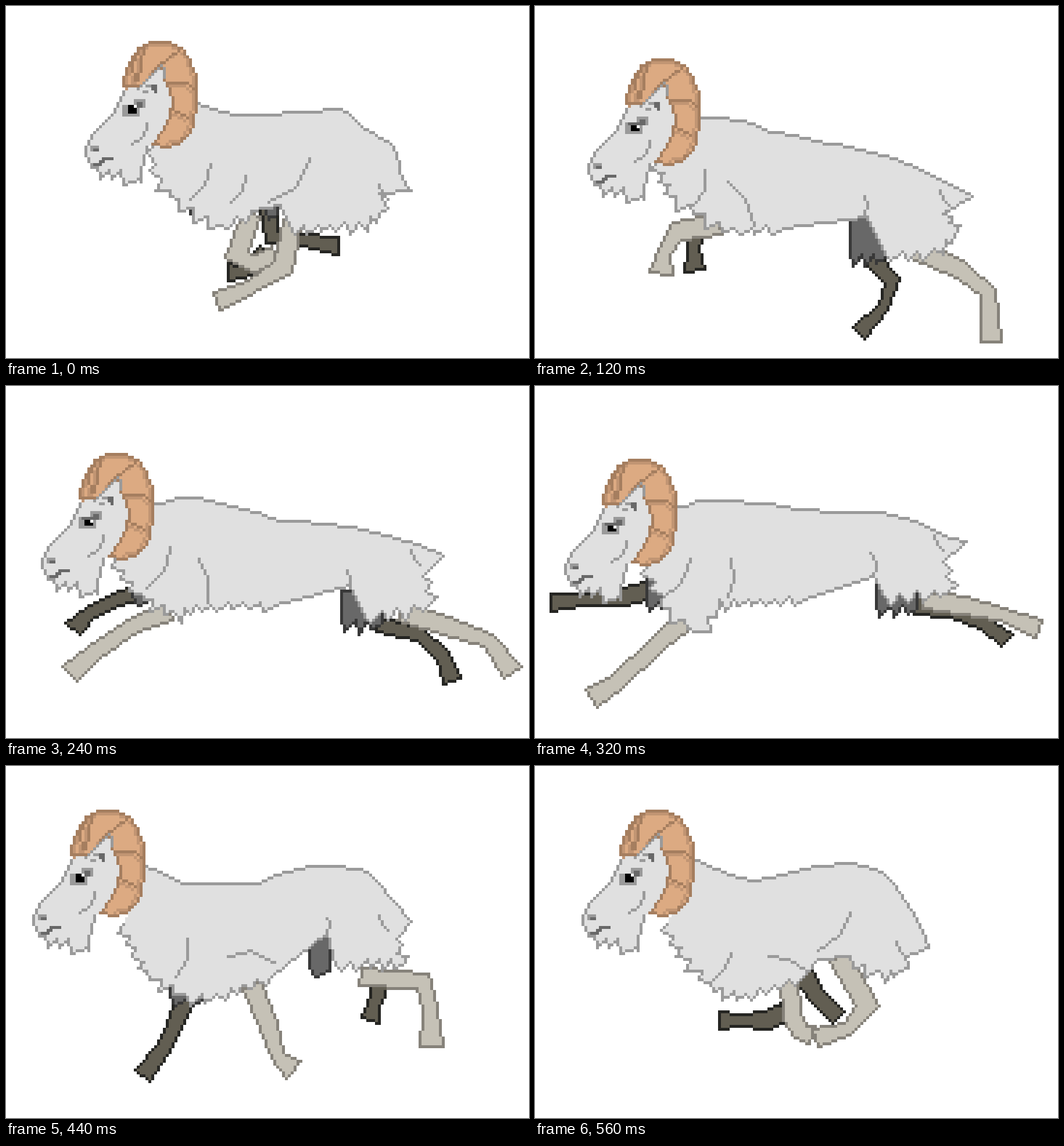
Write an HTML page with a canvas that moves like this. It is 900 px wide and 605 px high and loops after 600 ms.

```html
<!DOCTYPE html>
<html lang="en">
<head>
<meta charset="utf-8">
<title>Running ram</title>
<style>
html, body { margin: 0; width: 100%; height: 100%; overflow: hidden; background: #fff; }
canvas { display: block; }
</style>
</head>
<body>
<canvas id="stage" width="900" height="605"></canvas>
<script>
const CELL = 5, STEP_MS = 40, STEPS = 15;
const ctx = document.getElementById('stage').getContext('2d');

const WOOL = { fill: '#e0e0e0', line: '#9a9a9a' };
const FAR_WOOL = { fill: '#686868', line: '#383838' };
const NEAR_LEG = { fill: '#c5c1b6', line: '#86827a' };
const FAR_LEG = { fill: '#625e52', line: '#252522' };
const HORN = { fill: '#dcaa82', line: '#a57e5f', shade: '#c19573' };

// Key poses in cells. back: neck to tail tip; hem: tail base to throat;
// folds: shoulder, elbow, thigh lines; wool: far tufts as x, y, width, height;
// legs: hip, knee, ankle and hoof of near front, near hind, far front, far hind.
const POSES = [
  { step: 0, head: [0, 0],
    back: [66,33, 79,37, 103,36, 115,35, 123,42, 133,48, 136,59, 139,63],
    hem: [128,64, 129,71, 121,75, 97,76, 94,68, 84,70, 74,76, 59,67, 52,60, 49,48],
    folds: [[70,54, 63,66], [82,58, 77,67], [104,52, 90,67]],
    wool: [[63,66,4,7], [89,67,4,5]],
    legs: [[84,71, 79,85, 85,88, 92,85], [98,74, 95,89, 84,96, 72,101], [90,69, 91,79, 101,80, 114,82], [89,84, 84,89, 80,91, 76,91]] },
  { step: 2, head: [-4, 3],
    back: [62,36, 72,40, 84,43, 104,44, 119,47, 134,54, 143,65, 148,66],
    hem: [134,71, 140,77, 136,84, 114,86, 108,72, 78,75, 69,77, 57,72, 49,66, 45,49],
    folds: [[57,62, 57,70], [67,62, 78,75], [107,60, 105,72]],
    wool: [[64,70,2,2], [102,72,12,16]],
    legs: [[65,75, 51,79, 56,87, 62,93], [121,84, 140,92, 145,100, 144,117], [60,79, 64,82, 67,85, 69,89], [105,84, 105,95, 95,102, 81,109]] },
  { step: 4, head: [-14, 9],
    back: [52,39, 65,37, 76,42, 90,48, 104,51, 121,53, 141,57, 152,63],
    hem: [145,70, 150,78, 138,83, 126,86, 119,71, 92,76, 67,77, 59,72, 46,66, 36,58],
    folds: [[58,50, 51,66], [64,58, 71,75], [119,69, 119,72]],
    wool: [[48,69,4,3], [113,72,13,18]],
    legs: [[61,74, 46,75, 32,81, 24,90], [138,81, 153,89, 166,96, 169,113], [53,71, 44,74, 41,82, 40,92], [125,88, 140,93, 144,104, 141,115]] },
  { step: 8, head: [-17, 13],
    back: [49,41, 60,39, 80,40, 100,43, 119,43, 133,47, 141,51, 148,53],
    hem: [140,60, 143,70, 131,71, 120,73, 116,65, 92,73, 63,74, 56,84, 46,77, 37,62],
    folds: [[53,59, 44,72], [67,59, 66,72], [115,57, 116,65]],
    wool: [[38,64,8,13], [117,68,14,10]],
    legs: [[51,80, 42,88, 28,101, 19,107], [133,73, 147,75, 160,78, 173,83], [42,69, 30,72, 16,73, 5,74], [130,75, 143,77, 154,81, 162,87]] },
  { step: 10, head: [-18, 5],
    back: [48,34, 63,40, 93,40, 105,36, 127,36, 134,40, 140,47, 144,49],
    hem: [138,57, 144,66, 130,63, 117,71, 114,58, 87,72, 74,78, 61,79, 48,72, 39,57],
    folds: [[61,56, 55,69], [74,66, 90,68], [113,51, 114,58]],
    wool: [[38,65,13,14], [109,57,5,17]],
    legs: [[81,74, 81,92, 80,108, 76,117], [130,72, 153,73, 158,82, 161,94], [41,76, 34,83, 25,91, 14,98], [139,66, 139,74, 138,80, 138,88]] },
  { step: 12, head: [-18, 1],
    back: [48,33, 59,39, 76,40, 94,33, 111,33, 121,39, 129,49, 133,57],
    hem: [129,61, 129,69, 117,70, 109,66, 106,55, 95,71, 71,80, 61,78, 48,70, 40,52],
    folds: [[63,61, 61,74], [77,63, 93,65], [107,52, 106,55]],
    wool: [[74,77,9,9], [99,56,9,17]],
    legs: [[87,75, 99,86, 106,90, 121,91], [113,72, 133,74, 133,85, 131,98], [81,84, 81,95, 81,104, 79,114], [119,78, 116,81, 114,84, 112,86]] },
  { step: 14, head: [-11, 3],
    back: [55,32, 71,38, 81,38, 96,34, 113,34, 123,40, 131,52, 135,62],
    hem: [127,65, 126,70, 118,71, 108,66, 97,66, 92,72, 72,79, 60,75, 52,67, 44,54],
    folds: [[67,64, 61,73], [80,65, 93,70], [108,50, 97,63]],
    wool: [[90,68,2,2], [98,62,4,2]],
    legs: [[87,72, 88,86, 91,91, 95,92], [104,65, 114,82, 107,90, 96,93], [91,70, 96,78, 100,82, 104,86], [85,84, 79,87, 70,87, 63,87]] }
];

const mix = (a, b, t) => a + (b - a) * t;
const mixPoint = (p, q, t) => [mix(p[0], q[0], t), mix(p[1], q[1], t)];
const random = seed => { const r = Math.sin(seed * 12.9898) * 43758.5453; return r - Math.floor(r); };
const pairs = flat => flat.flatMap((x, i) => i % 2 ? [] : [[x, flat[i + 1]]]);
const snap = points => points.map(p => p.map(Math.round));

function blend(a, b, t) {
  if (typeof a === 'number') return mix(a, b, t);
  if (Array.isArray(a)) return a.map((v, i) => blend(v, b[i], t));
  return Object.fromEntries(Object.keys(a).map(k => [k, blend(a[k], b[k], t)]));
}

// Catmull-Rom curve through the points
function smooth(points) {
  const at = i => points[Math.max(0, Math.min(points.length - 1, i))];
  const out = [];
  for (let i = 0; i < points.length - 1; i++)
    for (let t = 0; t < 1; t += 0.25)
      out.push([0, 1].map(k => {
        const [a, b, c, d] = [-1, 0, 1, 2].map(j => at(i + j)[k]);
        return b + t / 2 * (c - a + t * (2 * a - 5 * b + 4 * c - d + t * (3 * (b - c) + d - a)));
      }));
  return [...out, points[points.length - 1]];
}

// Ragged wool along a line, with locks pointing away from the body
function tufts(points, seed) {
  const out = [points[0]];
  for (let i = 1; i < points.length; i++) {
    const a = points[i - 1], b = points[i];
    const dx = b[0] - a[0], dy = b[1] - a[1], length = Math.hypot(dx, dy) || 1;
    const count = Math.max(1, Math.round(length / 5));
    const push = (u, out1) => {
      const [x, y] = mixPoint(a, b, u);
      out.push([x + dy / length * out1, y - dx / length * out1]);
    };
    for (let k = 0; k < count; k++) {
      push((k + 0.7) / count, 1 + 2.5 * random(seed + i * 7 + k));
      push((k + 1) / count, -0.8);
    }
  }
  return out;
}

// Outline of a leg around its joints, narrow above the hoof
function limb(joints, scale) {
  const half = [3.5, 3, 2.5, 3.6];
  const normal = (p, q) => {
    const d = Math.hypot(q[0] - p[0], q[1] - p[1]) || 1;
    return [(q[1] - p[1]) / d, (p[0] - q[0]) / d];
  };
  const side = sign => joints.map((p, i) => {
    const before = normal(joints[Math.max(0, i - 1)], joints[Math.max(1, i)]);
    const after = normal(joints[Math.min(2, i)], joints[Math.min(3, i + 1)]);
    const sx = before[0] + after[0], sy = before[1] + after[1], size = Math.hypot(sx, sy) || 1;
    const w = sign * half[i] * scale / Math.max(0.7, size / 2) / size;
    return [p[0] + sx * w, p[1] + sy * w];
  });
  return [...side(1), ...side(-1).reverse()];
}

function fill(path, color) {
  const points = snap(path), ys = points.map(p => p[1]);
  ctx.fillStyle = color;
  for (let y = Math.min(...ys); y <= Math.max(...ys); y++) {
    const hits = [];
    points.forEach(([x1, y1], i) => {
      const [x2, y2] = points[(i + 1) % points.length];
      if ((y1 <= y) !== (y2 <= y)) hits.push(x1 + (y - y1) / (y2 - y1) * (x2 - x1));
    });
    hits.sort((p, q) => p - q);
    for (let i = 0; i + 1 < hits.length; i += 2) {
      const left = Math.ceil(hits[i]);
      ctx.fillRect(left, y, Math.floor(hits[i + 1]) - left + 1, 1);
    }
  }
}

function stroke(path, color) {
  const points = snap(path);
  ctx.fillStyle = color;
  for (let i = 1; i < points.length; i++) {
    const a = points[i - 1], b = points[i];
    const n = Math.max(Math.abs(b[0] - a[0]), Math.abs(b[1] - a[1])) || 1;
    for (let k = 0; k <= n; k++) ctx.fillRect(...mixPoint(a, b, k / n).map(Math.round), 1, 1);
  }
}

function shape(points, style) {
  fill(points, style.fill);
  stroke([...points, points[0]], style.line);
}

function rects(color, ...list) {
  ctx.fillStyle = color;
  for (const r of list) ctx.fillRect(...r);
}

const FACE = [
  ...pairs([41,28, 39,31, 37,36, 33,40, 30,43, 28,46, 27,48, 27,51, 29,55]),
  ...tufts([[46, 59], [39, 57], [31, 56]], 3).reverse(),
  ...pairs([46,60, 46,56, 48,48])
];
const EAR = pairs([45,28, 48,25, 53,20, 54,21, 54,24]);
const SKULL = [[52, 46], [57, 37], [57, 31], ...EAR.slice().reverse()];
const HORN_INNER = pairs([50,47, 53,43, 56,37, 57,32, 54,24, 53,20, 48,25, 46,27, 40,27]);
const HORN_RIDGES = [[47,13, 46,20, 45,25], [45,15, 43,20, 44,25], [59,15, 57,16, 50,22], [56,26, 62,26, 64,28], [57,35, 59,36, 62,38]].map(pairs);

// Rounded arc from the forehead over the top and down to the horn's tip
function hornArc(rx, ry) {
  const round = v => Math.sign(v) * Math.abs(v) ** 0.84;
  return Array.from({ length: 33 }, (_, i) => {
    const angle = mix(-3.3, 1.65, i / 32) + 0.1;
    return [52.5 + rx * round(Math.cos(angle)), 30 + ry * round(Math.sin(angle))];
  }).filter(p => p[0] > 52 || p[1] < 28);
}

function drawHorn() {
  const edge = [...hornArc(12.5, 18), ...HORN_INNER];
  fill(edge, HORN.fill);
  stroke(hornArc(11.5, 17), HORN.shade);
  for (const ridge of HORN_RIDGES) stroke(ridge.map(([x, y]) => [x - 1, y + 1]), HORN.shade);
  for (const ridge of HORN_RIDGES) stroke(ridge, HORN.line);
  stroke([...edge, edge[0]], HORN.line);
}

function drawHead([x, y], squint) {
  ctx.save();
  ctx.translate(Math.round(x), Math.round(y));
  fill([...FACE, ...SKULL], WOOL.fill);
  stroke(FACE, WOOL.line);
  drawHorn();
  stroke(EAR, WOOL.line);
  stroke(pairs([43,47, 47,44, 48,40]), WOOL.line);
  rects(WOOL.line, [40, 34, 6, 4], [44, 32, 4, 3], [48, 27, 4, 1], [47, 29, 2, 1], [29, 48, 3, 2]);
  rects(FAR_WOOL.fill, [45, 33, 2, 2], [50, 27, 2, 2], [51, 29, 1, 1], [30, 49, 2, 1], [30, 54, 3, 1], [32, 53, 2, 1], [33, 52, 4, 1]);
  rects('#000', [42, 34, 3, 3]);
  if (squint) rects(FAR_WOOL.fill, [41, 34, 4, 1]);
  rects('#fff', [44, squint ? 35 : 34, 1, 1]);
  ctx.restore();
}

function drawBody({ back, hem, folds }) {
  const spine = smooth(pairs(back)), edge = pairs(hem);
  const outline = [...spine, ...tufts(edge.slice(0, 4), 1), ...tufts(edge.slice(5), 40)];
  const rump = spine.length + tufts(edge.slice(0, 4), 1).length;
  outline.splice(rump, 0, edge[4]);
  fill(outline, WOOL.fill);
  stroke(outline, WOOL.line);

  for (const [a, b] of folds.map(pairs)) {
    const [x, y] = mixPoint(a, b, 0.5);
    stroke([a, [x + (b[1] - a[1]) * 0.15, y - (b[0] - a[0]) * 0.15], b], WOOL.line);
  }
  const [tailX, tailY] = spine[spine.length - 1];
  stroke([[tailX - 11, tailY - 2], [tailX - 10, tailY + 1], [tailX - 8, tailY + 3]], WOOL.line);
}

function drawFarWool([x, y, w, h], seed) {
  const low = y + h * 0.8;
  shape([[x, y], [x + w, y], ...tufts([[x + w, low], [x, low]], seed)], FAR_WOOL);
}

function draw(step) {
  const next = Math.max(1, POSES.findIndex(p => p.step >= step));
  const from = POSES[next - 1], to = POSES[next];
  const t = (step - from.step) / (to.step - from.step);
  const pose = blend(from, to, t);
  // Hind legs reach further back in the middle of the leap
  const reach = step > 4 && step < 8 ? 0.08 * Math.sin(Math.PI * t) : 0;
  const stretch = ([x, y]) => [x + Math.max(0, x - 135) * reach, y];
  const [nearFront, nearHind, farFront, farHind] = pose.legs.map(leg => pairs(leg).map(stretch));

  ctx.setTransform(CELL, 0, 0, CELL, 0, 0);
  rects('#fff', [0, 0, 180, 121]);
  for (const leg of [farFront, farHind]) shape(limb(leg, 0.85), FAR_LEG);
  pose.wool.forEach((box, i) => drawFarWool(box, 80 + i));
  for (const leg of [nearFront, nearHind]) shape(limb(leg, 1), NEAR_LEG);
  drawBody(pose);
  drawHead(pose.head, step > 1 && step < 11);
}

const start = performance.now();
let shown = -1;
function tick() {
  const step = Math.floor((performance.now() - start) / STEP_MS) % STEPS;
  if (step !== shown) draw(shown = step);
  requestAnimationFrame(tick);
}
tick();
</script>
</body>
</html>
```
